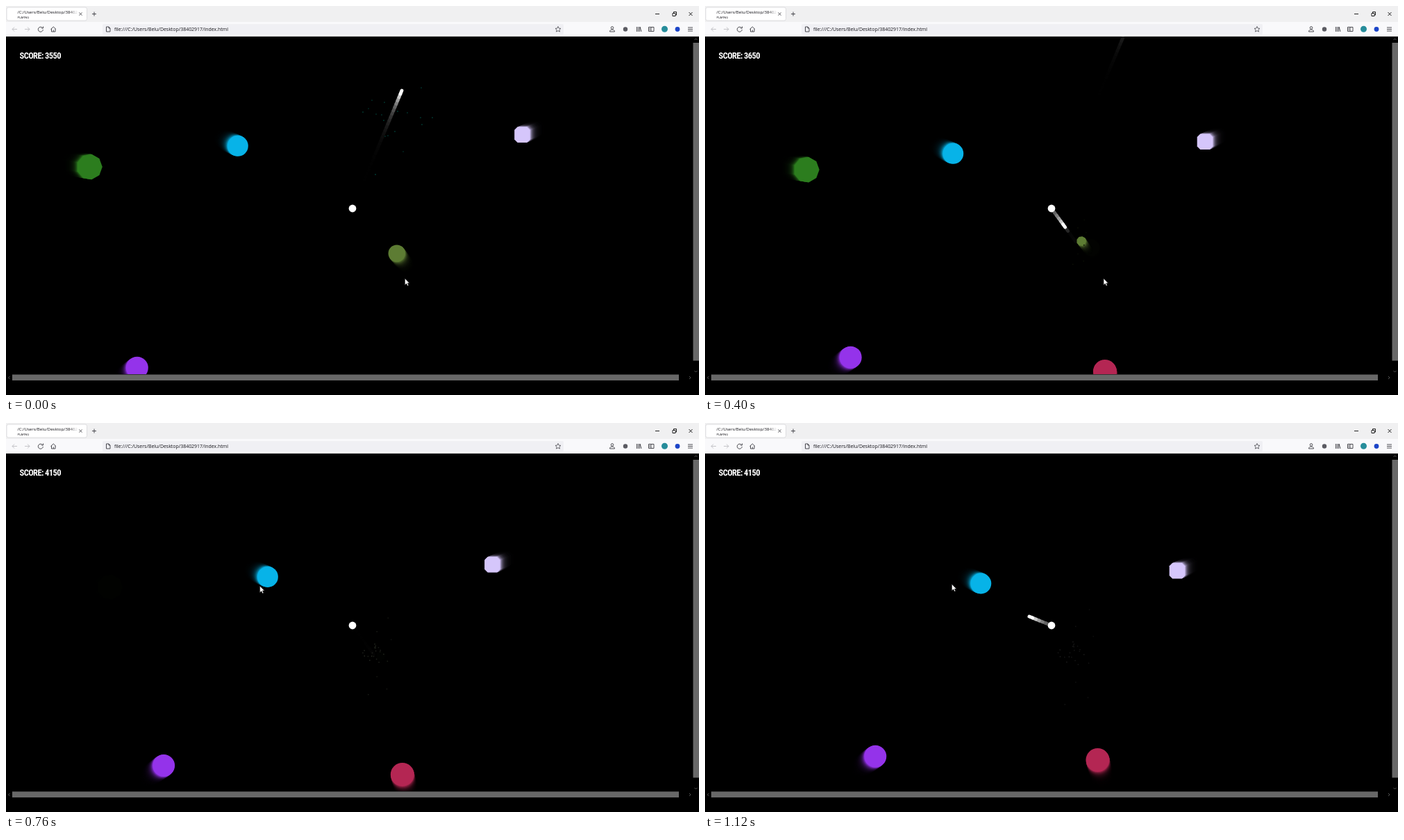
Recreate the animation shown at these times as an HTML page with a canvas. Size 998 by 561 pixels, loop 1.16 s.

```html
<!DOCTYPE html>
<html lang="en">
<head>
<meta charset="utf-8">
<style>
  html, body { margin: 0; width: 100%; height: 100%; overflow: hidden; background: #000; }
  canvas, svg { position: absolute; left: 0; top: 0; width: 998px; height: 561px; }
  text { font-family: "Open Sans", "Noto Sans", sans-serif; fill: #15141a; }
  #score {
    font-family: "Roboto Condensed", "Liberation Sans Narrow", "Open Sans", sans-serif;
    font-stretch: 75%; font-weight: 700; font-size: 12.5px; letter-spacing: -.6px; fill: #fff;
  }
  .icon { fill: none; stroke: #4a4a50; stroke-width: 1; }
  .pale { stroke: #c4c4c8; }
  .dim { stroke: #555; }
</style>
</head>
<body>
<canvas id="game" width="998" height="561"></canvas>
<svg viewBox="0 0 998 561">
  <defs>
    <linearGradient id="fade"><stop offset="0" stop-color="#fff" stop-opacity="0"/><stop offset="1" stop-color="#fff"/></linearGradient>
  </defs>

  <rect width="998" height="23" fill="#f0f0f1"/>
  <rect y="23" width="998" height="21" fill="#f9f9fb"/>
  <rect x="1" y="2" width="115.500" height="19" rx="2.500" fill="#fff" stroke="#d2d2d6" stroke-width=".7"/>
  <text x="16.500" y="11" font-size="6.100">/C:/Users/Belu/Desktop/38402</text>
  <rect x="91" y="3" width="13" height="10" fill="url(#fade)"/>
  <rect x="104" y="3" width="11" height="16" fill="#fff"/>
  <text x="16.500" y="17.500" font-size="4.200">PLAYING</text>
  <g class="icon">
    <path d="M105.500 9.500l4 4m0-4l-4 4M124 11.500h6m-3-3v6"/>
    <path d="M935 11.500h6M960 10.500h4v4h-4zM961.500 10V8.500h4v4.500H964M983.500 9l5 5m0-5l-5 5" stroke="#222"/>
    <path class="pale" d="M16 33.500H9m3-3l-3 3 3 3M27 33.500h7m-3-3l3 3-3 3"/>
    <path d="M52.500 31.500a3.500 3.500 0 1 0 .8 2.500M53.500 29.500v2.500H51"/>
    <path d="M64.500 33.500l3.800-3.500 3.700 3.500M65.500 33v4h5.500v-4M68.300 37v-2.500"/>
  </g>
  <rect x="139" y="26" width="664" height="15" rx="2" fill="#f0f0f4"/>
  <path class="icon" d="M144.500 30h3.500l2 2v5h-5.500zM148 30v2h2"/>
  <text x="156" y="36.300" font-size="6.950">file:///C:/Users/Belu/Desktop/38402917/index.html</text>
  <g class="icon">
    <path d="M795 29.500l1.200 2.600 2.800.3-2.100 1.900.6 2.800-2.500-1.400-2.500 1.400.6-2.800-2.100-1.900 2.800-.3z" stroke-width=".8"/>
    <circle cx="873" cy="31.500" r="1.800"/><path d="M869.500 37c0-4 7-4 7 0z"/>
    <path d="M908.500 30v7m2-7v7m2-7v7m.5-7l2 7"/>
    <path d="M925.500 30.500h7.500v6h-7.500zM929 30.500v6M926.500 32.500h1.500m-1.500 2h1.500"/>
    <path d="M982 31h7m-7 2.500h7m-7 2.500h7"/>
  </g>
  <circle cx="892" cy="33.500" r="3.200" fill="#5b5b62"/>
  <circle cx="948.500" cy="33.300" r="4.500" fill="#278d9b"/>
  <circle cx="967" cy="33.500" r="3.400" fill="#1c45c8"/>

  <rect y="531" width="998" height="30"/>
  <rect x="989" y="44" width="9" height="517"/>
  <rect x="9" y="531.500" width="960" height="8.500" fill="#686868"/>
  <rect x="989.500" y="53" width="8.500" height="458.500" fill="#686868"/>
  <path class="icon dim" d="M5.500 534l-2 2 2 2M984 534l2 2-2 2M991.500 49l2-2 2 2M991.500 526l2 2 2-2"/>

  <text id="score" x="19.500" y="76">SCORE: 3550</text>
  <path id="cursor" d="M0 0v9.300l2.200-2 1.500 3.200 1.500-.7-1.500-3.100h2.800z" fill="#fff" stroke="#222" stroke-width=".5"/>
</svg>
<script>
const LOOP = 1160, STEP = 40;
const TICK = 1 / 70, FADE = 0.79, TRAIL = 28;
const HOME = { x: 499, y: 292 };
const SHOT_SPEED = 364;
const HIT = 0.155, KILL = 0.43;

const ctx = document.getElementById('game').getContext('2d');
const score = document.getElementById('score');
const cursor = document.getElementById('cursor');

const OLIVE = [93, 124, 51], TEAL = [0, 140, 122], WHITE = [255, 255, 255];

// x, y at progress 0; dx, dy travelled over one loop
const enemies = [
  { x: 120.2, y: 232, dx: 70, dy: 11, r: 18.6, sides: 9, rgb: [44, 125, 30], to: KILL },
  { x: 333.8, y: 201.8, dx: 63.5, dy: 29.7, r: 15, rgb: [7, 179, 232] },
  { x: 743.5, y: 185.6, dx: -63.5, dy: 27.5, r: 11.3, cut: 4.5, rgb: [213, 198, 251] },
  { x: 562.8, y: 356.8, dx: -46, dy: -58, r: 12.3, rgb: OLIVE, to: HIT },
  { x: 558, y: 360.5, dx: -43, dy: -58, r: 7, sides: 9, rgb: OLIVE, from: HIT, to: KILL },
  { x: 188.8, y: 521.8, dx: 56.5, dy: -41, r: 16, rgb: [148, 51, 234] },
  { x: 582, y: 551, dx: -16.5, dy: -65, r: 17, rgb: [180, 38, 83], from: 0.12 }
];

const shots = [
  { aim: [71, -170], from: -0.506, to: 0.232 },
  { aim: [75, 103], from: -0.006, to: 0.16 },
  { aim: [75, 103], from: 0.145, to: 0.262 },
  { aim: [75, 103], from: 0.278, to: KILL },
  { aim: [-144, -58], from: 0.905, to: 2 }
];

const tealSparks = [[-28, -24], [-33, -12], [-41, -7], [-22, -4], [-14, -3], [-11, 5], [9, -8], [23, -6],
  [42, 1], [59, 1], [44, 11], [5, 21], [-9, 28], [-5, 27], [17, 50], [-23, 83], [43, -42], [-10, -21]];
const farSparks = [[16, -57], [21, -22], [-16, 67], [-2, 38], [14, 58], [-2, -35], [15, 13]];

function random(seed) {
  const v = Math.sin(seed * 127.1) * 43758.5453;
  return v - Math.floor(v);
}
const nearSparks = Array.from({ length: 20 }, (_, i) => {
  const angle = random(i + 1) * Math.PI * 2, d = 4 + 17 * random(i + 50);
  return [Math.cos(angle) * d - 4, Math.sin(angle) * d * 0.8];
});

// Linear interpolation through [time, value] pairs
function track(keys, t) {
  const i = keys.findIndex(k => k[0] > t);
  if (i < 0) return keys[keys.length - 1][1];
  if (i === 0) return keys[0][1];
  const [t0, a] = keys[i - 1], [t1, b] = keys[i];
  return a + (b - a) * (t - t0) / (t1 - t0);
}
const clock = [[0, 0], [120, 0.087], [280, 0.252], [400, 0.37], [680, 0.606], [880, 0.787], [1120, 1]];
const cursorX = [[0, 574.5], [480, 574], [680, 386], [800, 355.5]];
const cursorY = [[0, 393], [480, 393], [680, 240.5], [800, 232.5]];

const shade = (rgb, k) => `rgb(${rgb.map(c => Math.round(c * k)).join()})`;

function drawEnemy(e, q, k) {
  const x = e.x + e.dx * q, y = e.y + e.dy * q, r = e.r;
  ctx.fillStyle = shade(e.rgb, k);
  ctx.beginPath();
  if (e.cut) {
    const c = r - e.cut;
    [[-c, -r], [c, -r], [r, -c], [r, c], [c, r], [-c, r], [-r, c], [-r, -c]]
      .forEach(([a, b]) => ctx.lineTo(x + a, y + b));
  } else if (e.sides) {
    for (let i = 0; i < e.sides; i++) {
      const angle = i / e.sides * Math.PI * 2;
      ctx.lineTo(x + r * Math.cos(angle), y + r * Math.sin(angle));
    }
  } else {
    ctx.arc(x, y, r, 0, Math.PI * 2);
  }
  ctx.fill();
}

function drawShot(s, q, k) {
  const [ax, ay] = s.aim, len = Math.hypot(ax, ay);
  const at = time => {
    const d = Math.max(0, time - s.from) * SHOT_SPEED / len;
    return [HOME.x + ax * d, HOME.y + ay * d];
  };
  ctx.strokeStyle = shade(WHITE, k);
  ctx.lineWidth = 4.8;
  ctx.lineCap = 'round';
  ctx.beginPath();
  ctx.moveTo(...at(q - TICK));
  ctx.lineTo(...at(q));
  ctx.stroke();
}

function drawSparks(points, x, y, spread, rgb, k, size = 1.5) {
  points.forEach(([dx, dy], i) => {
    ctx.fillStyle = shade(rgb, k * (0.6 + 0.4 * random(i + 9)));
    ctx.fillRect(x + dx * spread - size / 2, y + dy * spread - size / 2, size, size);
  });
}

function drawBursts(t, p) {
  if (t <= 160) drawSparks(tealSparks, 555, 160, 1 + p * 0.3, TEAL, 0.55 * Math.max(0, 1 - p / 0.11));
  if (p >= HIT && p < KILL) {
    drawSparks(farSparks, 538, 338, (p - HIT) * 2.4, OLIVE, 0.55 * Math.exp(-(p - HIT) * 6));
  }
  if (p >= KILL) {
    const age = t - 470;
    const spread = (1 - Math.exp(-0.0052 * age)) / 0.875;
    const glow = 0.24 + 0.55 * Math.exp(-age / 200);
    const grey = Math.min(1, age / 420);
    const rgb = OLIVE.map(c => c + (115 - c) * grey);
    drawSparks(nearSparks, 536, 332, spread, rgb, glow);
    drawSparks(farSparks, 536, 332, spread, rgb, glow * 0.75);
  }
}

function render(time) {
  const t = Math.floor(time % LOOP / STEP) * STEP;
  const p = track(clock, t);
  ctx.fillStyle = '#000';
  ctx.fillRect(0, 0, 998, 561);

  const alive = (o, q) => q >= (o.from ?? -9) && q < (o.to ?? 9);
  for (let n = TRAIL; n >= 0; n--) {
    const q = p - n * TICK, k = FADE ** n;
    enemies.forEach(e => alive(e, q) && drawEnemy(e, q, k));
    shots.forEach(s => alive(s, q) && drawShot(s, q, k));
  }
  drawBursts(t, p);

  ctx.fillStyle = '#fff';
  ctx.beginPath();
  ctx.arc(HOME.x, HOME.y, 5.4, 0, Math.PI * 2);
  ctx.fill();

  score.textContent = 'SCORE: ' + (p < HIT ? 3550 : p < KILL ? 3650 : 4150);
  cursor.setAttribute('transform', `translate(${track(cursorX, t)} ${track(cursorY, t)})`);
}

const start = performance.now();
function loop() {
  render(performance.now() - start);
  requestAnimationFrame(loop);
}
loop();
</script>
</body>
</html>
```
